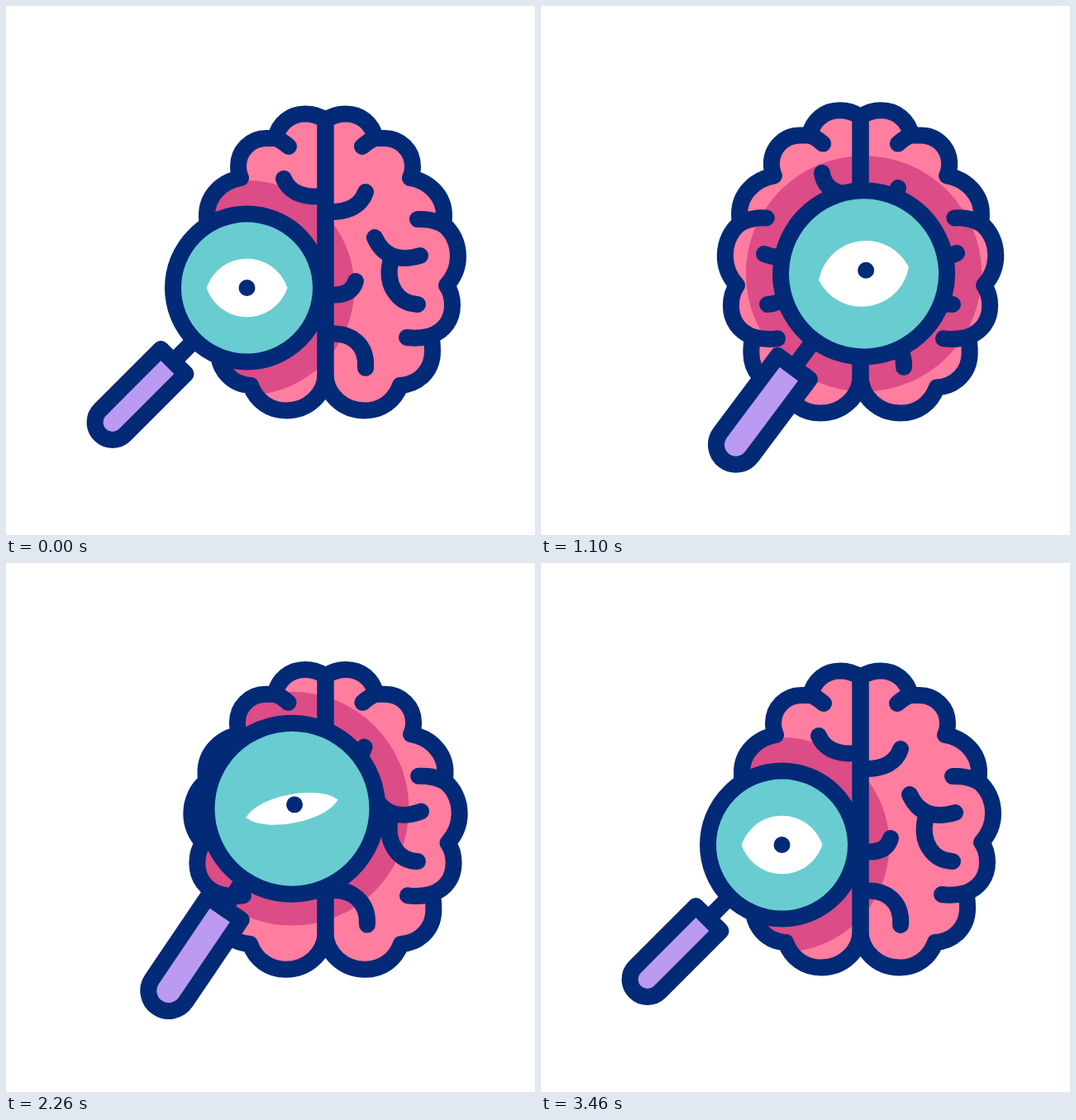
An HTML page without scripts for the animation above (3600 ms loop, 640x640 px).

```html
<!DOCTYPE html>
<html lang="en">
<head>
<meta charset="utf-8">
<title>Brain under a magnifier</title>
<style>
@property --x { syntax: "<length>"; inherits: true; initial-value: 291.5px }
@property --y { syntax: "<length>"; inherits: true; initial-value: 341px }
@property --zoom { syntax: "<number>"; inherits: true; initial-value: 1 }
@property --tilt { syntax: "<angle>"; inherits: true; initial-value: 0deg }
@property --look-x { syntax: "<length>"; inherits: true; initial-value: 0px }
@property --look-y { syntax: "<length>"; inherits: true; initial-value: 0px }
@property --open { syntax: "<number>"; inherits: true; initial-value: 1 }
@property --shade { syntax: "<length>"; inherits: true; initial-value: 130px }
@property --swell { syntax: "<number>"; inherits: true; initial-value: 1 }
@property --lift { syntax: "<length>"; inherits: true; initial-value: 0px }

html, body { margin: 0; width: 100%; height: 100%; overflow: hidden; background: #fff }
svg {
  --navy: #032a77;
  display: block; width: 100%; height: 100%;
  animation: 3.6s ease-in-out infinite;
  animation-name: slide, rise, lens, glance, blink, shade, pulse;
}
.line { fill: none; stroke: var(--navy); stroke-width: 20px; stroke-linecap: round; stroke-linejoin: round }

.half {
  transform-origin: 386.5px 310px;
  transform: translateY(var(--lift)) scale(var(--swell));
  stroke-width: calc(20px / var(--swell));
}
.left { transform: translateY(var(--lift)) scale(calc(-1 * var(--swell)), var(--swell)) }
.pink { fill: #ff7d9f }
.shadow { cx: var(--x); cy: var(--y); r: var(--shade); fill: #dc4c86 }
.fold { d: var(--from); animation: fold 3.6s ease-in-out infinite }

.lens {
  transform: translate(var(--x), var(--y)) rotate(calc(0deg - var(--tilt))) scale(var(--zoom));
  stroke-width: calc(20px / var(--zoom));
}
.eye { transform: scaleY(var(--open)); fill: #fff; stroke: none }
.pupil { cx: calc(var(--x) + var(--look-x)); cy: calc(var(--y) + var(--look-y)); fill: var(--navy) }

@keyframes slide {
  0%, 8.3% { --x: 291.5px }
  22.8% { --x: 392.5px; animation-timing-function: ease-in }
  39.4% { --x: 385.5px; animation-timing-function: linear }
  48.9% { --x: 375px; animation-timing-function: linear }
  60% { --x: 357px; animation-timing-function: linear }
  62.8% { --x: 346px; animation-timing-function: cubic-bezier(.3, .3, .6, 1) }
  77.2%, 100% { --x: 291.5px }
}
@keyframes rise {
  0%, 22.8% { --y: 341px; animation-timing-function: cubic-bezier(.4, 0, .8, .8) }
  30% { --y: 325px; animation-timing-function: cubic-bezier(.3, .4, .7, .8) }
  39.4% { --y: 311px; animation-timing-function: cubic-bezier(.3, .4, .7, .8) }
  48.9% { --y: 302px; animation-timing-function: ease-out }
  62.2% { --y: 297px }
  75.6%, 100% { --y: 341px }
}
@keyframes lens {
  0%, 13.3% { --zoom: 1; --tilt: 0deg }
  23.9% { --zoom: 1.115; --tilt: 7.4deg }
  47.2% { --zoom: 1.163; --tilt: 12.2deg }
  63.9% { --zoom: 1.156; --tilt: 10.9deg }
  81.1% { --zoom: .913; --tilt: -4.5deg }
  96.1%, 100% { --zoom: 1; --tilt: 0deg }
}
@keyframes glance {
  0%, 24% { --look-x: 0px; --look-y: 0px }
  39.4% { --look-x: 7px; --look-y: -11px }
  48.9%, 56% { --look-x: 8px; --look-y: -12.5px }
  68%, 100% { --look-x: 0px; --look-y: 0px }
}
@keyframes blink {
  0%, 60% { --open: 1 }
  65% { --open: .05 }
  70%, 100% { --open: 1 }
}
@keyframes shade {
  0%, 13.3% { --shade: 130px }
  23.9% { --shade: 142px }
  47.2%, 57.2% { --shade: 145.5px }
  80% { --shade: 113px }
  96.1%, 100% { --shade: 130px }
}
@keyframes pulse {
  0%, 2.8% { --swell: 1; --lift: 0px }
  23.3% { --swell: 1.035; --lift: 0px }
  37.2% { --swell: 1.008; --lift: -1px }
  52.8% { --swell: 1.035; --lift: -.8px }
  66.1% { --swell: 1.007; --lift: .5px }
  80.6% { --swell: 1.035; --lift: 0px }
  96.1%, 100% { --swell: 1; --lift: 0px }
}
@keyframes fold {
  0%, 2.8% { d: var(--from) }
  22.2%, 57.2% { d: var(--to) }
  68.3% { d: var(--from) }
  80.6% { d: var(--to) }
  96.1%, 100% { d: var(--from) }
}
</style>
</head>
<body>
<svg viewBox="0 0 640 640">
  <defs>
    <path id="lobes" d="M386.5 138C394 133 402 130.5 411 130.5C429 130.5 443 142 447 160C451 160 454 160 458 160
      C477 160 492 175 492 194C492 199 491 204 489 208C512 212 530 230 530 253C530 257 530 261 529 264
      C540 273 547 287 547 303C547 316 542 328 533 338C538 345 540 352 540 362C540 380 530 393 514 399
      C516 405 516 411 516 418C516 441 499 458 477 459C470 478 454 489.5 434 489.5C408 489.5 386.5 470 386.5 445Z"/>
    <path id="notches" d="M446 160Q439 163 431 170M498 258Q516 257 530 265M485 401Q500 403 514 399"/>
    <clipPath id="brain">
      <use href="#lobes" class="half"/>
      <use href="#lobes" class="half left"/>
    </clipPath>
  </defs>

  <use href="#lobes" class="half pink"/>
  <use href="#lobes" class="half left pink"/>
  <g clip-path="url(#brain)"><circle class="shadow"/></g>

  <g class="line half"><use href="#lobes"/><use href="#notches"/></g>
  <g class="line half left"><use href="#lobes"/><use href="#notches"/></g>

  <g class="line">
    <path class="fold" style="--from:path('M336 209C341 222 355 233 386 230');--to:path('M340 202C342 218 355 230 386 229')"/>
    <path class="fold" style="--from:path('M435 225C430 240 416 250 390 249');--to:path('M432 220C428 236 416 248 390 247')"/>
    <path class="fold" style="--from:path('M446 280C456 302 474 310 501 302');--to:path('M445 283C455 305 478 310 503 299')"/>
    <path class="fold" style="--from:path('M465 310C459 338 474 360 498 361');--to:path('M464 314C460 340 476 361 498 361')"/>
    <path class="fold" style="--from:path('M423 333C419 346 408 351 390 349');--to:path('M425 337C418 349 408 351 390 350')"/>
    <path class="fold" style="--from:path('M390 397C418 394 437 410 435 438');--to:path('M390 396C416 391 440 408 439 437')"/>
    <path d="M270 300C290 308 310 302 327 282M274 361C290 360 306 350 308 325"/>
  </g>

  <g class="line lens">
    <g transform="rotate(135)">
      <path d="M89.5 0H126"/>
      <path fill="#bb9af1" d="M126 -21.3H230A21.3 21.3 0 0 1 230 21.3H126Z"/>
    </g>
    <circle r="89.5" fill="#68ccd1"/>
    <path class="eye" d="M-49 0C-32 -47 32 -47 49 0C32 47 -32 47 -49 0Z"/>
  </g>
  <circle class="pupil" r="10"/>
</svg>
</body>
</html>
```
